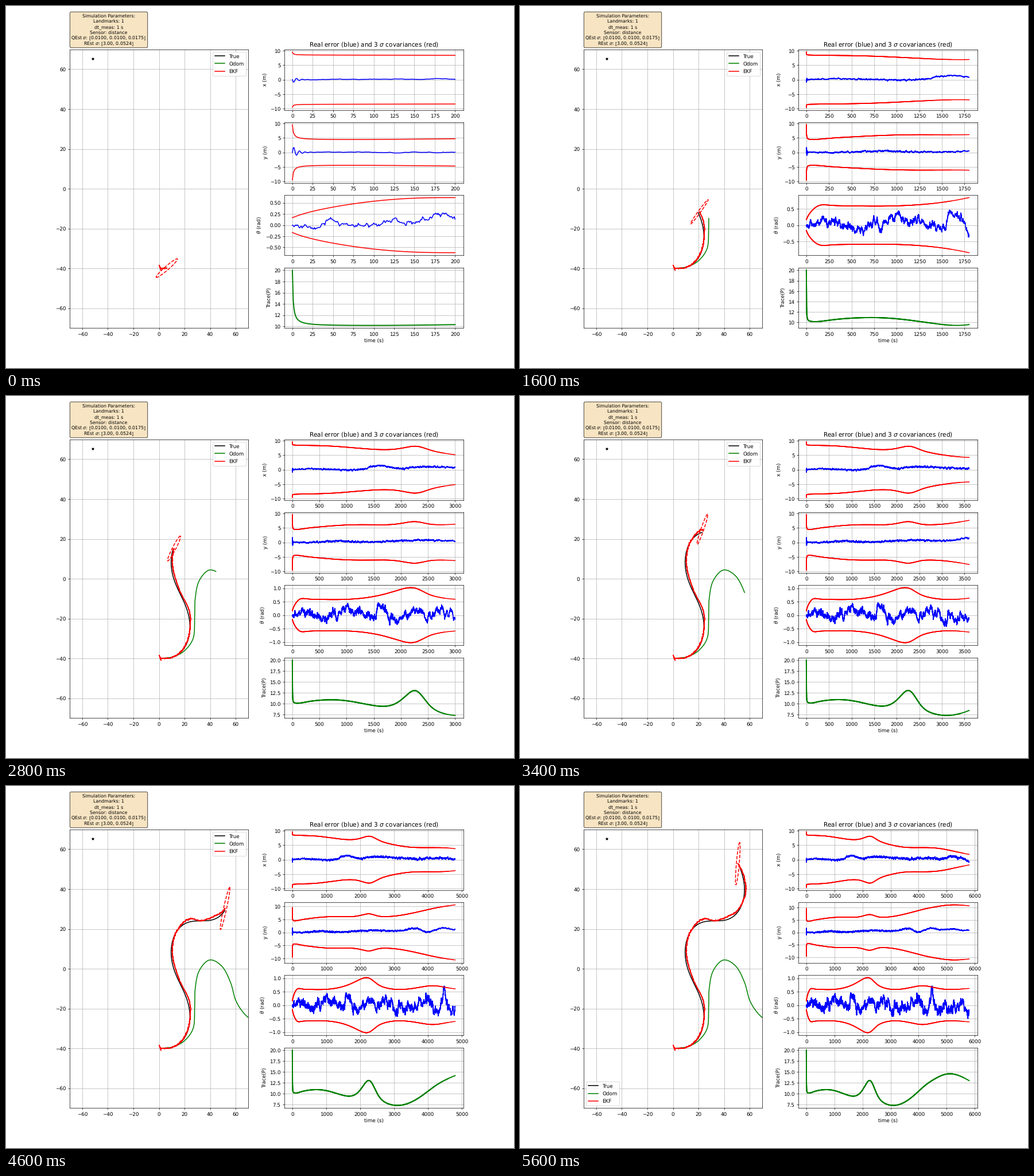
A matplotlib script for the animation above (5800 ms loop, 885 by 632 pixels).

```python
import numpy as np
import matplotlib.pyplot as plt
from matplotlib.animation import FuncAnimation
from matplotlib.patches import FancyBboxPatch

W, H = 885, 632
STEP, FRAMES, OVERLAY = 200, 29, 4
N = STEP * FRAMES + 1
SPEED, TURN = 0.025, np.radians(0.1)
LANDMARK = np.array([-52, 65.3])
SIGMA_XY, SIGMA_A, SIGMA_DIST = 0.01, np.radians(1), 3
t = np.arange(N)
rng = np.random.default_rng(4)


def spline(values, gap=400):
    """Smooth curve through key values spaced evenly in time."""
    y = np.array(values)
    m = np.gradient(y)
    i = np.minimum(t // gap, len(y) - 2)
    u = t / gap - i
    return ((2 * u**3 - 3 * u**2 + 1) * y[i] + (u**3 - 2 * u**2 + u) * m[i]
            + (3 * u**2 - 2 * u**3) * y[i + 1] + (u**3 - u**2) * m[i + 1])


def jitter(keep, scale):
    """Correlated noise that starts at zero."""
    out = np.zeros(N)
    for k, e in enumerate(rng.normal(0, scale, N - 1), 1):
        out[k] = keep * out[k - 1] + e
    return out


# True path: constant speed, sinusoidal turn rate
heading = TURN * 2000 / np.pi * (1 - np.cos(np.pi * t / 2000))
steps = SPEED * np.exp(1j * heading)
true = 1 - 40j + np.append(0, np.cumsum(steps)[:-1])

# Odometry drifts away from the true path
odom = spline([1 - 40j, 11 - 39.2j, 20.2 - 36j, 26.9 - 29.6j, 27.9 - 19.7j,
               28.3 - 10.2j, 31.3 - 1.2j, 39.5 + 4.4j, 49.3 + 1.2j,
               56 - 6.9j, 60 - 15.8j, 66.5 - 22.4j, 75 - 27j, 84 - 31j,
               93 - 35j, 102 - 39j])

sight = true - complex(*LANDMARK)
sight /= abs(sight)


def filter_covariances():
    """Kalman filter covariance with one distance reading per second."""
    P = 10 * np.diag([1, 1, np.radians(1)**2])
    Q = np.diag([SIGMA_XY, SIGMA_XY, SIGMA_A])**2
    F = np.eye(3)
    history = [P]
    for k in range(1, N):
        F[:2, 2] = -steps[k - 1].imag, steps[k - 1].real
        P = F @ P @ F.T + Q
        h = np.array([sight[k].real, sight[k].imag, 0])
        ph = P @ h
        P = P - np.outer(ph, ph) / (h @ ph + SIGMA_DIST**2)
        history.append(P)
    return np.array(history)


cov = filter_covariances()
bounds = 3 * np.sqrt(np.diagonal(cov, axis1=1, axis2=2)).T
trace = np.trace(cov, axis1=1, axis2=2)

# Estimation error: slow drift plus noise along the line of sight
settle = -2.6 * np.exp(-t / 6) * np.sin(2 * np.pi * t / 7)
radial = settle + jitter(.9, .08) * np.minimum(1, .3 + t / 1000)
drift = (spline([0, .3, .1, -.1, 1.3, .4, 1, .8, .6, .3, .4, .5, .2, 1.2,
                 .2, -1.8])
         + 1j * spline([0, 0, .4, .2, .3, .5, .8, .6, .6, 1.6, .2, 1.7, 1.1,
                        1.4, .8, 1.2]))
error = drift + radial * sight + jitter(.95, .025) + 1j * jitter(.95, .025)
est = true + error
errors = [error.real, error.imag, jitter(.987, .028)]


def ellipse(k):
    """Three sigma outline of the position estimate."""
    val, vec = np.linalg.eigh(cov[k, :2, :2])
    a = np.arange(0, 2 * np.pi + .1, .1)
    axes = 3 * vec[:, ::-1] * np.sqrt(val[::-1])
    x, y = axes @ np.array([np.cos(a), np.sin(a)])
    return est[k].real + x, est[k].imag + y


plt.rcParams.update({"lines.linewidth": 1.75, "text.hinting": "none"})
fig = plt.figure(figsize=(14, 10), dpi=63.215)
world = fig.add_subplot(1, 2, 1)
charts = [fig.add_subplot(4, 2, n) for n in (2, 4, 6, 8)]
labels = ["x (m)", "y (m)", r"$\theta$ (rad)", "Trace(P)"]
info = ["Simulation Parameters:", "Landmarks: 1", "dt_meas: 1 s",
        "Sensor: distance", r"QEst $\sigma$: [0.0100, 0.0100, 0.0175]",
        r"REst $\sigma$: [3.00, 0.0524]"]


def draw_info():
    page = fig.add_axes([0, 0, 1, 1])
    page.set(xlim=(0, W), ylim=(H, 0))
    page.axis("off")
    page.add_patch(FancyBboxPatch(
        (111.3, 10.4), 135.4, 62.6, boxstyle="round,pad=0,rounding_size=2.4",
        facecolor="wheat", edgecolor="black", alpha=.8))
    for k, line in enumerate(info):
        page.text(179, 19.4 + 9.9 * k, line, fontsize=9, ha="center",
                  va="baseline")


def draw_world(k):
    world.cla()
    world.plot(*LANDMARK, "*k", ms=5)
    for path, color, name in ((true, "k", "True"), (odom, "g", "Odom"),
                              (est, "r", "EKF")):
        world.plot(path[:k + 1].real, path[:k + 1].imag, color, label=name)
    world.plot(*ellipse(k), "--r")
    world.axis([-70, 70, -70, 70])
    world.grid(True)
    world.legend(loc="best")


def draw(i):
    draw_world(STEP * (i + 1))
    for ax, label in zip(charts, labels):
        ax.cla()
        ax.grid(True)
        ax.set_ylabel(label)
    # Each update is plotted over the earlier ones, so older parts look bolder
    for j in range(max(0, i - OVERLAY + 1), i + 1):
        s = slice(STEP * (j + 1) + 1)
        for ax, err, bound in zip(charts, errors, bounds):
            ax.plot(t[s], err[s], "b")
            ax.plot(t[s], bound[s], "r")
            ax.plot(t[s], -bound[s], "r")
        charts[3].plot(t[s], trace[s], "g", lw=2.2)
    charts[0].set_title(r"Real error (blue) and 3 $\sigma$ covariances (red)")
    charts[3].set_xlabel("time (s)")


draw_info()
anim = FuncAnimation(fig, draw, frames=FRAMES, interval=STEP, repeat=True,
                     cache_frame_data=False)
plt.show()
```
